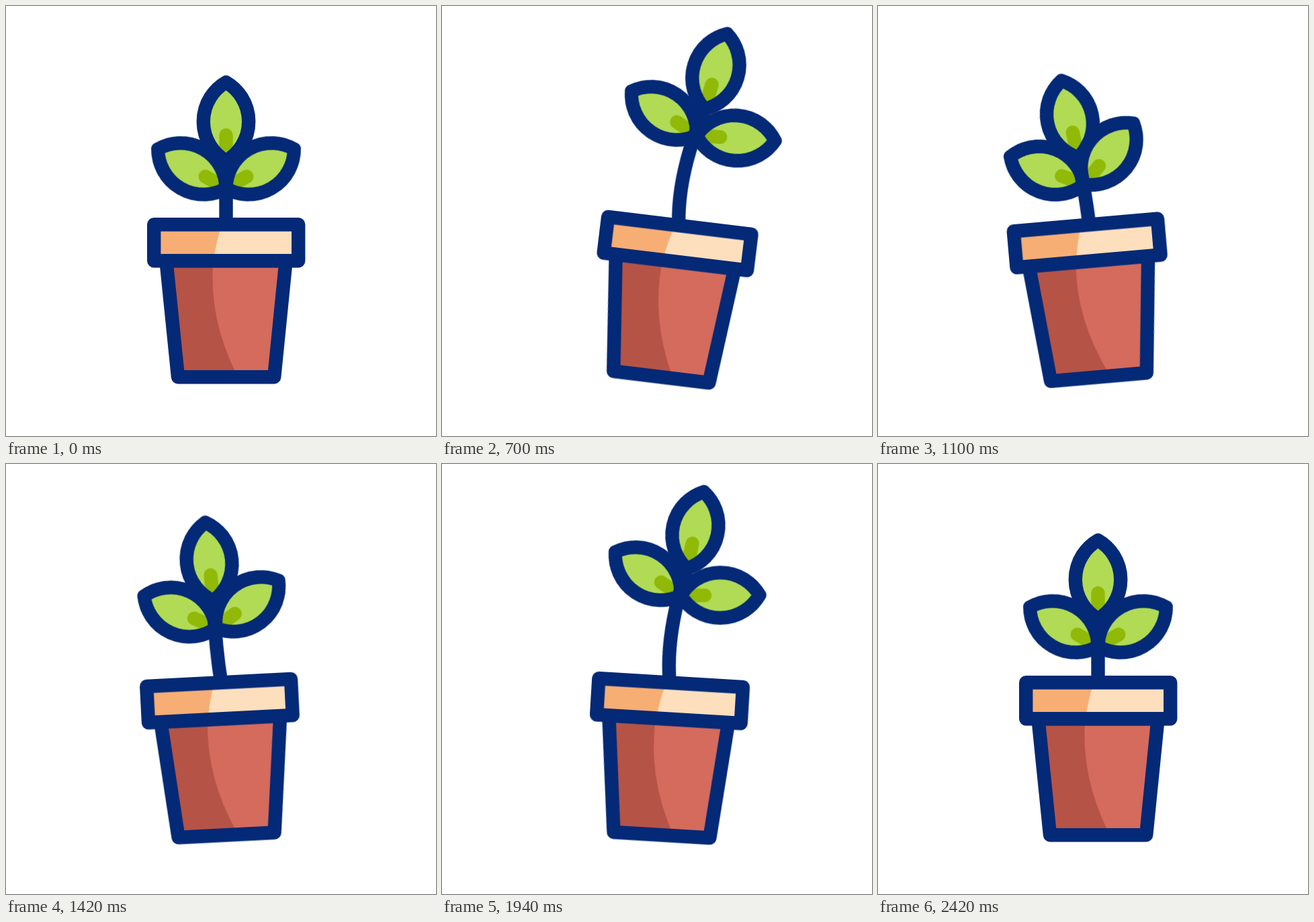
An HTML page without scripts that plays this animation: 640x640 px, repeating every 2.62 s.

```html
<!DOCTYPE html>
<html lang="en">
<head>
<meta charset="utf-8">
<title>Swaying potted plant</title>
<style>
  html, body { margin: 0; width: 100%; height: 100%; overflow: hidden; background: #fff; }
  svg { display: block; width: 100%; height: 100%; }

  .line { fill: none; stroke: #042976; stroke-width: 20.4; stroke-linejoin: round; }
  .vein { fill: none; stroke: #91b908; stroke-width: 20.4; stroke-linecap: round; }

  .plant, .head, .left, .right, .stem {
    animation: 2620ms cubic-bezier(.333, 0, .667, 1) infinite;
  }
  .plant { animation-name: tilt; transform-origin: 327.5px 542px; }
  .head  { animation-name: grow; transform-origin: 327.5px 240px; }
  .left  { animation-name: left; transform-origin: 0 0; }
  .right { animation-name: right; transform-origin: 0 0; }
  .stem  { animation-name: bend; }

  /* Swings peak every 600 ms, then rest until the loop ends. */
  @keyframes tilt {
    0%, 91.603%, 100% { transform: rotate(0deg); }
    22.901% { transform: rotate(8deg); }
    45.802% { transform: rotate(-6deg); }
    68.702% { transform: rotate(4deg); }
  }
  @keyframes grow {
    0%, 91.603%, 100% { transform: rotate(0deg) translateY(0px); }
    22.901% { transform: rotate(11.3deg) translateY(-90px); }
    45.802% { transform: rotate(-8.7deg) translateY(0px); }
    68.702% { transform: rotate(10.5deg) translateY(-90px); }
  }
  @keyframes left {
    0%, 91.603%, 100% { transform: rotate(-60deg); }
    22.901% { transform: rotate(-73.8deg); }
    45.802% { transform: rotate(-55.8deg); }
    68.702% { transform: rotate(-70.3deg); }
  }
  @keyframes right {
    0%, 91.603%, 100% { transform: rotate(60deg); }
    22.901% { transform: rotate(79.4deg); }
    45.802% { transform: rotate(49deg); }
    68.702% { transform: rotate(80deg); }
  }
  @keyframes bend {
    0%, 91.603%, 100% { d: path("M327.5 325 Q327.5 282 327.5 235"); }
    22.901% { d: path("M342.2 413.7 Q316 340 327.5 235"); }
    45.802% { d: path("M321 325 Q327.5 280 327.5 235"); }
    68.702% { d: path("M341 414 Q316 340 327.5 235"); }
  }
</style>
</head>
<body>
<svg viewBox="0 0 640 640">
  <defs>
    <path id="blade" d="M0 0A67.6 67.6 0 0 1 0-117A67.6 67.6 0 0 1 0 0Z"/>
    <g id="side">
      <use href="#blade" fill="#b1db54"/>
      <path class="vein" d="M0 0V-35.5"/>
      <use href="#blade" class="line"/>
    </g>
  </defs>

  <g class="plant">
    <g class="head">
      <g transform="translate(327.5 230.5)">
        <use href="#blade" fill="#b1db54"/>
        <path class="vein" d="M0 0V-38.3"/>
        <use href="#blade" class="line"/>
      </g>
      <g transform="translate(327.5 271.5)">
        <g class="left"><use href="#side"/></g>
        <g class="right"><use href="#side"/></g>
      </g>
      <path class="line stem" d="M327.5 325Q327.5 282 327.5 235"/>
    </g>

    <path fill="#b55347" d="M238.4 379L256 552.3H399.2L416.6 379Z"/>
    <path fill="#d46b5d" d="M308.5 379Q301 465 344 550L399.2 552.3L416.6 379Z"/>
    <path class="line" d="M238.4 379L256 552.3H399.2L416.6 379Z"/>

    <path fill="#f7ae74" d="M220.2 325.3H435.2V379.2H220.2Z"/>
    <path fill="#fddfbd" d="M321 325.3Q312.5 352 309 379.2H435.2V325.3Z"/>
    <path class="line" d="M220.2 325.3H435.2V379.2H220.2Z"/>
  </g>
</svg>
</body>
</html>
```
